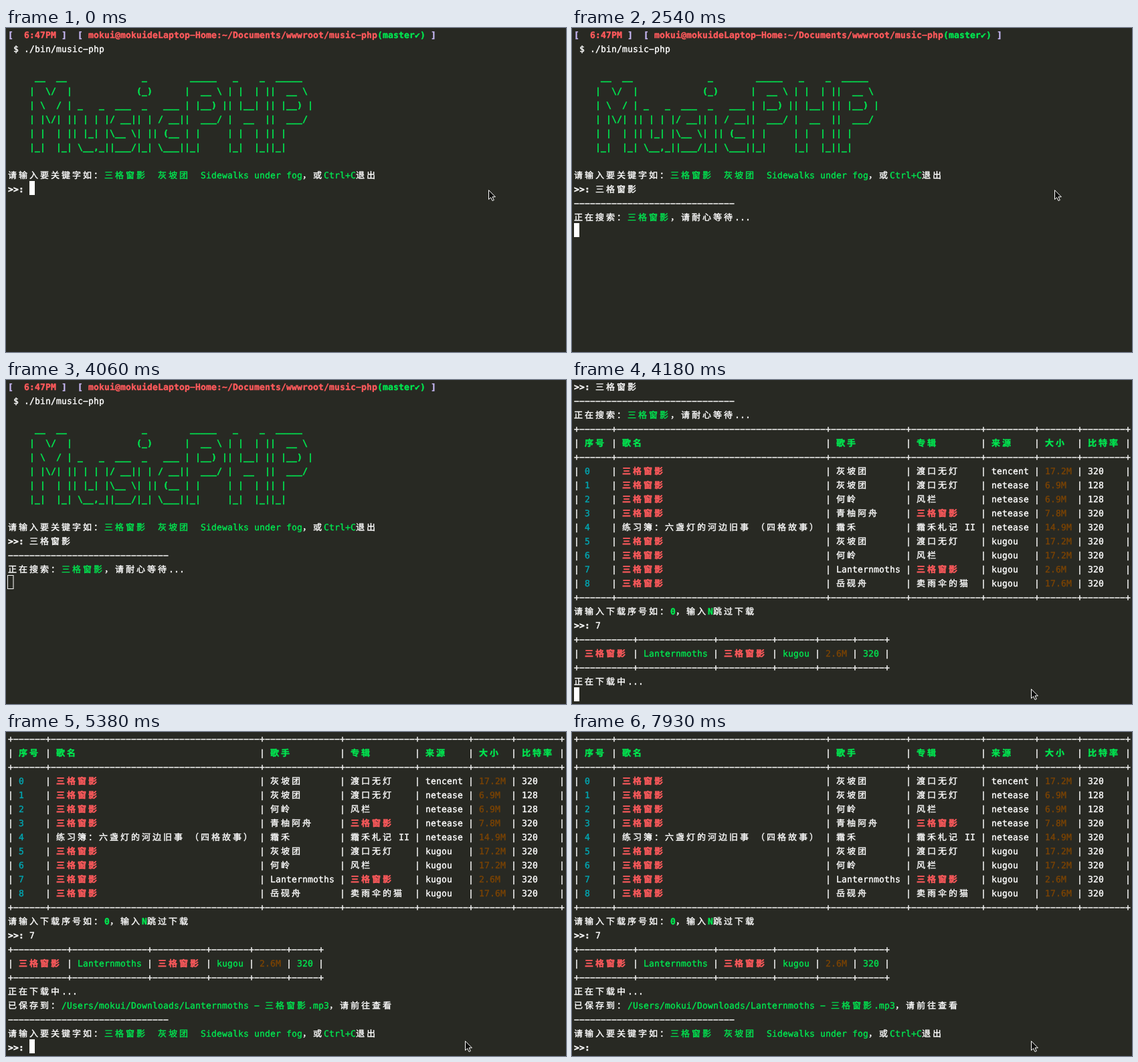
Animation, 837 px wide and 485 px high, one loop 8 s. Source, as an HTML page with a canvas:

```html
<!DOCTYPE html>
<html lang="zh-CN">
<head>
<meta charset="utf-8">
<style>
  html, body { margin: 0; width: 100%; height: 100%; overflow: hidden; background: #282923; }
  canvas { display: block; }
</style>
</head>
<body>
<canvas id="screen" width="837" height="485"></canvas>
<script>
const ctx = document.getElementById('screen').getContext('2d');
const LOOP = 8000, LEFT = 3, CELL = 8, LINE = 21, BASELINE = 15;
const COLORS = { w: '#ffffff', g: '#00e650', r: '#ff5a5c', c: '#00a6b2', b: '#7a4304', v: '#c5b6f2' };
const FONT = '13px "DejaVu Sans Mono", "Noto Sans CJK SC", "Noto Sans CJK", monospace';
const SMOOTHING = .4; // extra stroke that thickens the glyphs

// Markup: <g> switches to a colour, <G> to the same colour in bold, <> back to plain white.
const TAG = /<(\w?)>/;
const isWide = ch => /[\u2e80-\uffef]/.test(ch);
const cellsOf = text => [...text.replace(/<\w?>/g, '')].reduce((n, ch) => n + (isWide(ch) ? 2 : 1), 0);

const SONG = '三格窗影', BAND = '灰坡团', SINGER = 'Lanternmoths', USER = 'mokui';
const hot = text => text === SONG ? `<R>${text}<>` : text;

function table(widths, rows) {
  const border = '+' + widths.map(w => '-'.repeat(w + 2) + '+').join('');
  const line = cells => '|' + cells.map((cell, i) =>
    ` ${cell}${' '.repeat(widths[i] - cellsOf(cell))} |`).join('');
  return { border, lines: rows.map(line) };
}

const songs = table([4, 37, 12, 11, 7, 5, 6], [
  ['序号', '歌名', '歌手', '专辑', '来源', '大小', '比特率'].map(t => `<G>${t}<>`),
  ...[
    [SONG, BAND, '渡口无灯', 'tencent', '17.2M', '320'],
    [SONG, BAND, '渡口无灯', 'netease', '6.9M', '128'],
    [SONG, '何岭', '风栏', 'netease', '6.9M', '128'],
    [SONG, '青柚阿舟', SONG, 'netease', '7.8M', '320'],
    ['练习簿：六盏灯的河边旧事 （四格故事）', '霜禾', '霜禾札记 II', 'netease', '14.9M', '320'],
    [SONG, BAND, '渡口无灯', 'kugou', '17.2M', '320'],
    [SONG, '何岭', '风栏', 'kugou', '17.2M', '320'],
    [SONG, SINGER, SONG, 'kugou', '2.6M', '320'],
    [SONG, '岳砚舟', '卖雨伞的猫', 'kugou', '17.6M', '320'],
  ].map(([title, singer, album, site, size, rate], i) =>
    [`<c>${i}<>`, hot(title), singer, hot(album), site, `<b>${size}<>`, rate]),
]);

const choice = table([8, 12, 8, 5, 4, 3], [
  [hot(SONG), `<g>${SINGER}<>`, hot(SONG), '<g>kugou<>', '<b>2.6M<>', '<g>320<>'],
]);

const art = String.raw`
     __  __              _        _____   _    _  _____
    |  \/  |            (_)      |  __ \ | |  | ||  __ \
    | \  / | _   _  ___  _   ___ | |__) || |__| || |__) |
    | |\/| || | | |/ __|| | / __||  ___/ |  __  ||  ___/
    | |  | || |_| |\__ \| || (__ | |     | |  | || |
    |_|  |_| \__,_||___/|_| \___||_|     |_|  |_||_|`.split('\n').slice(1);

const rule = '-'.repeat(30);
const ask = `请输入要关键字如：<g>${SONG}  ${BAND}  Sidewalks under fog<>，或<g>Ctrl+C<>退出`;

const log = [
  `<V>[<R>  6:47PM <V>]  [<R> ${USER}@${USER}deLaptop-Home:~/Documents/wwwroot/music-php<G>(master✔)<V> ]`,
  ' $ ./bin/music-php',
  '',
  ...art.map(line => '<G>' + line),
  '',
  ask,
  `<W>>>:<> ${SONG}`,
  rule,
  `正在搜索：<g>${SONG}<>，请耐心等待...`,
  songs.border, songs.lines[0], songs.border, ...songs.lines.slice(1), songs.border,
  '请输入下载序号如：<G>0<>，输入<G>N<>跳过下载',
  '<W>>>:<> 7',
  choice.border, ...choice.lines, choice.border,
  '正在下载中...',
  `已保存到：<g>/Users/${USER}/Downloads/${SINGER} - ${SONG}.mp3<>，请前往查看`,
  rule,
  ask,
  '<W>>>:<> ',
];

// Each view: start time, first and end log line, text cursor cell and row.
const views = [
  { at: 0, from: 0, to: 11, tail: '<W>>>:<> ', col: 4, row: 11 },
  { at: 1790, from: 0, to: 12, col: 12, row: 11 },
  { at: 2540, from: 0, to: 14, col: 0, row: 14 },
  { at: 4180, from: 11, to: 33, col: 0, row: 22 },
  { at: 4330, from: 14, to: 37, col: 4, row: 22 },
];

// The text cursor toggles at each of these times, starting visible.
const blinks = [300, 750, 1350, 1790, 3130, 3580, 4930, 5380, 5980, 6430, 6880, 7480, 7930];
const HOLLOW = [4060, 4180];

const pointerStops = [
  [0, 721, 242], [3130, 726, 244], [3280, 811, 375], [3430, 830, 446],
  [3580, 775, 470], [3730, 758, 478], [3870, 758, 500], [4180, 686, 462],
];
const pointerShape = new Path2D('M.5 .7V14.6L3.6 11.7L6 16.6L8.3 15.5L6 10.8H10.4Z');

function drawLine(markup, row) {
  let col = 0;
  markup.split(TAG).forEach((part, i, parts) => {
    if (i % 2) return;
    const style = parts[i - 1] || 'w', key = style.toLowerCase();
    ctx.font = (style === key ? '' : 'bold ') + FONT;
    ctx.textRendering = 'geometricPrecision';
    ctx.fillStyle = ctx.strokeStyle = COLORS[key];
    ctx.lineWidth = SMOOTHING;
    for (const ch of part) {
      const glyph = ch === '-' ? '\u2212' : ch; // hyphens are wide and level with the plus sign
      const x = LEFT + col * CELL, y = row * LINE + BASELINE;
      ctx.fillText(glyph, x, y);
      ctx.strokeText(glyph, x, y);
      col += isWide(ch) ? 2 : 1;
    }
  });
}

function drawTextCursor(t, { col, row }) {
  const x = LEFT + col * CELL, y = row * LINE - 2;
  if (t >= HOLLOW[0] && t < HOLLOW[1]) {
    ctx.strokeStyle = '#ffffff';
    ctx.lineWidth = 1;
    ctx.strokeRect(x - .5, y + .5, CELL + .5, LINE - 1);
  } else if (blinks.filter(b => b <= t).length % 2 === 0) {
    ctx.fillStyle = '#ffffff';
    ctx.fillRect(x, y, CELL, LINE);
  }
}

function drawPointer(t) {
  const [, x, y] = pointerStops.findLast(stop => stop[0] <= t);
  ctx.save();
  ctx.translate(x, y);
  ctx.fillStyle = '#0c0c0a';
  ctx.strokeStyle = '#ffffff';
  ctx.lineWidth = 1;
  ctx.fill(pointerShape);
  ctx.stroke(pointerShape);
  ctx.restore();
}

function draw(now) {
  const t = now % LOOP;
  const view = views.findLast(v => v.at <= t);
  ctx.fillStyle = '#282923';
  ctx.fillRect(0, 0, 837, 485);
  const lines = log.slice(view.from, view.to);
  if (view.tail) lines.push(view.tail);
  lines.forEach(drawLine);
  drawTextCursor(t, view);
  drawPointer(t);
}

const start = performance.now();
function frame() {
  draw(performance.now() - start);
  requestAnimationFrame(frame);
}
frame();
</script>
</body>
</html>
```
